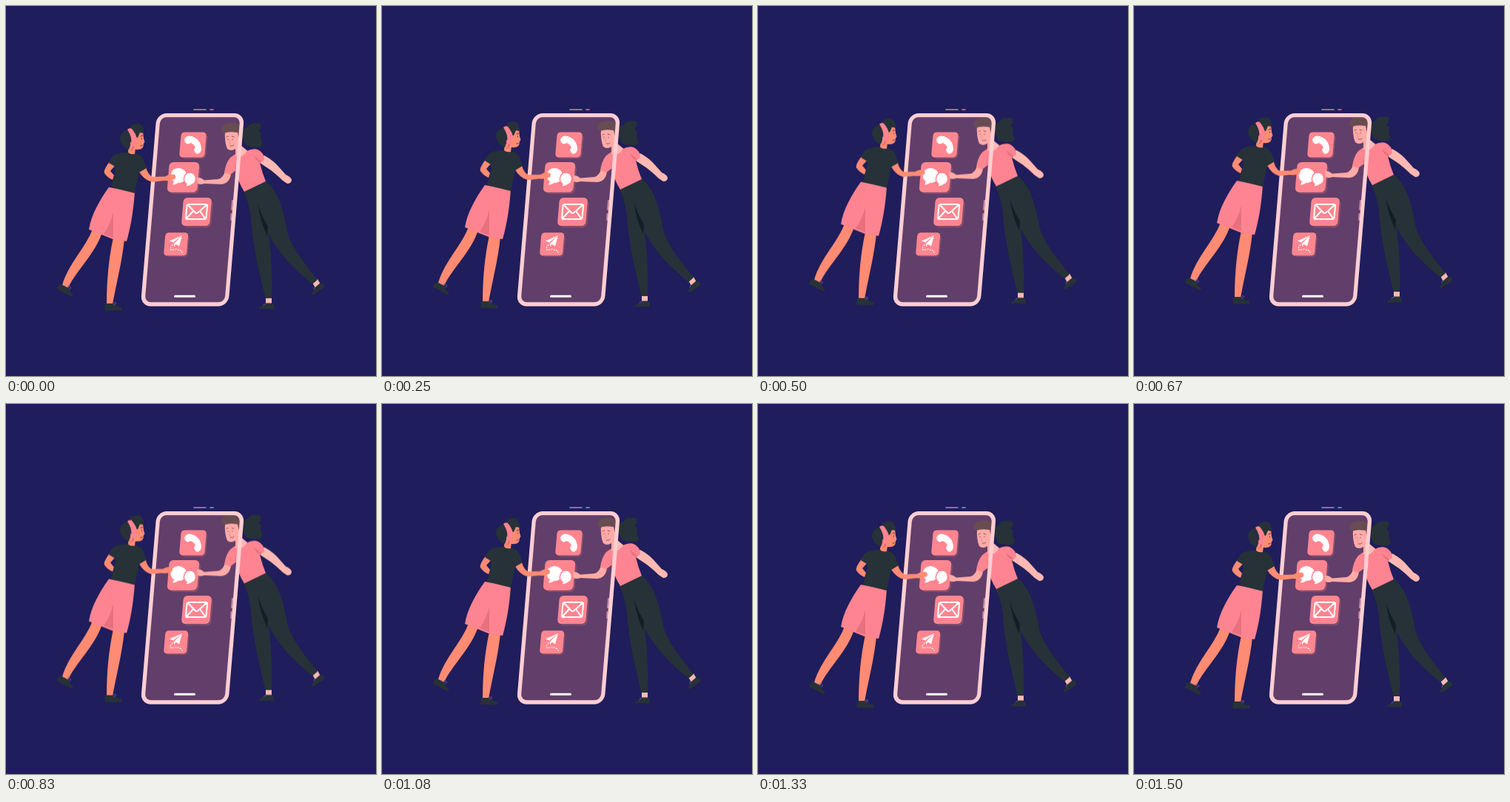
These frames come from a looping animation (500 px wide and 500 px high, 1.54 s). An HTML page without scripts:

```html
<!DOCTYPE html>
<html lang="en">
<head>
<meta charset="utf-8">
<title>Reaching through the phone</title>
<style>
  html, body { margin: 0; width: 100%; height: 100%; overflow: hidden; background: #1f1d5c; }
  svg { display: block; width: 100%; height: 100%; }

  .bob, .reach {
    animation: bob 1540ms cubic-bezier(.37, 0, .63, 1) -50ms infinite;
  }
  .reach { animation-name: reach; transform-origin: 182px 222px; }
  @keyframes bob { 50% { transform: translateY(-9px); } }
  @keyframes reach { 50% { transform: rotate(2deg) scaleX(.91); } }

  .dark { fill: #263238; }
  .deep { fill: #151d24; }
  .pink { fill: #ff8491; }
  .fold { fill: #e8717f; }
  .tan { fill: #ff8b73; }
  .fair { fill: #ffb9b2; }
  .white { fill: #fff; }
  .line { fill: none; stroke-linecap: round; stroke-linejoin: round; }
  .ink { stroke: #263238; stroke-width: .8; }
  .lace { stroke: #6b4a9c; stroke-width: 1; }
</style>
</head>
<body>
<svg viewBox="0 0 500 500">
  <defs>
    <rect id="glass" x="-56.6" y="-127.7" width="113.2" height="255.4" rx="11" transform="translate(252 275.3) skewX(-4.8)"/>
    <g id="tile">
      <rect x="-15" y="-15" width="35" height="35" rx="5" fill="#51345f"/>
      <rect x="-18" y="-18" width="36" height="36" rx="5" class="pink"/>
    </g>
  </defs>

  <!-- Tiles sit beneath the tinted glass -->
  <use href="#tile" transform="translate(252.500 187.500) skewX(-4.8) scale(.95)"/>
  <use href="#tile" transform="translate(239.500 231.300) skewX(-4.8) scale(1.13)"/>
  <use href="#tile" transform="translate(257.500 278) skewX(-4.8) scale(1.06)"/>
  <use href="#tile" transform="translate(229.700 321.800) skewX(-4.8) scale(.86)"/>

  <!-- Woman -->
  <g class="bob">
    <path class="dark" d="M318 167 Q327 165 329 160 Q336 157 344 159 Q346 165 341 170 L346 172 Q342 177 347 187 L344 191 Q334 192 325 189 Q319 181 318 167Z"/>
    <path class="fair" d="M351 393 H359 V403 H351Z M414 374 L421 369 L425 376 L418 381Z"/>
    <path class="dark" d="M350 401.500 L360 401.500 Q363 405 362 409.500 H342 Q341 407 345 406Z"/>
    <path class="dark" d="M425 374 Q431 376 430.500 380 L417 389.500 Q412 391 414 387 L418 380Z"/>
    <path class="line lace" d="M348 404 l3 -2 M416 383 l1 -3"/>
    <path class="dark" d="M321 251 L352 237 C366 249 374 270 379 299 C382 321 400 343 421 370 L414 376 C391 357 369 336 355 308 C359 340 360 370 359 395 L350.500 395 C342 360 335 330 332 300 C331 280 328 265 321 251Z"/>
    <path class="deep" d="M340 266 Q343 280 354 298 L353 311 Q344 293 340 266Z"/>
    <path class="fair" d="M343 206 L349 202 Q362 209 370 219 L378 228 Q385 231 386 235 Q386 240 380 240 L374 236 Q367 229 358 222 L343 212Z"/>
    <path class="fair" d="M296 223 L304 227 Q302 240 291 241 L268 240 Q263 242 259 240 L258 232 Q263 231 268 235.500 L287 234 Q294 232 296 223Z"/>
    <path class="pink" d="M303 205 Q312 197 325 196 Q334 192 340 194 Q349 198 349 208 L343 212 Q346 225 351 237 L322 251 Q313 237 311 222 L303 228 L295 225 Q297 212 303 205Z"/>
    <path class="fold" d="M309 211 L312 225 L309 220Z M335 202 Q337 209 344 212 L345 210Z"/>
    <path class="fair" d="M296 168 H315 L317 188 L326 195.500 Q320 206 310 203 L310 193 Q304 197 299 193 Q295 184 296 168Z"/>
    <path class="dark" d="M291 166 Q294 157 306 158 Q316 158 319 165 L318 184 Q315 183 313 171 Q301 169 295 172 Q291 171 291 166Z"/>
    <path class="line ink" d="M298 177 l2.500 -1 M305 176 l3 1 M300 180 v.8 M306 180 v.8 M303 189 q3 1 5 -1"/>
    <path class="line" d="M302.500 181 l-1 5 h2" stroke="#e5827f" stroke-width=".8"/>
  </g>

  <!-- Phone -->
  <use href="#glass" fill="#ff8b8e" fill-opacity=".3"/>
  <path class="line" d="M306 263 L305 275 M304.500 281 L304 289" stroke="#c98a9f" stroke-width="2"/>
  <use href="#glass" fill="none" stroke="#ffced2" stroke-width="5.3"/>
  <path class="line" d="M254 140 H270 M276 140 H280" stroke="#d77f96" stroke-width="1.6"/>
  <path class="line" d="M228.500 392.300 H254.500" stroke="#fff" stroke-width="3"/>

  <!-- Icons -->
  <path class="white" d="M241 181 Q242 176 248 175.500 L251 181 Q256 183 258 189 L264 193 Q264 198 259 200 Q255 199 254 194 L256 191 Q254 187 250 185 L246 186.500 Q242 186 241 181Z M248 175.500 Q263 178 264 193 L257 189 Q255 183 250 181Z"/>
  <path class="white" d="M233.500 219 a11 10 0 1 1 -1 20 Q229 242 225 241.500 L227 237 A11 10 0 0 1 233.500 219Z"/>
  <path class="white" d="M249 225 a8 8.500 0 0 1 2 16.500 Q248 244 243 243.500 L244 240.500 A8 8.500 0 0 1 249 225Z" stroke="#ff8491" stroke-width="1.4"/>
  <path class="line" d="M247 268 H270 Q272.500 268 272 270.500 L270.500 286 Q270 288 268 288 H245 Q242.500 288 243 285.500 L244.500 270 Q245 268 247 268Z M246 269 L256 279.500 Q257.500 280.500 259 279.500 L271 269 M244 287 L253 277 M269 287 L262 277" stroke="#fff" stroke-width="2"/>
  <path class="white" d="M238 310 L221 317.500 L226 319.500Z M238 310 L227.500 320.500 L234 324.500Z M226.500 320.500 L227.500 325 L229.500 322Z"/>
  <path class="line" d="M225 323 Q220 328 224 330 Q230 327 237 331 L238 333" stroke="#fff" stroke-width="1.1" stroke-dasharray="1.2 2.2"/>

  <!-- Man -->
  <g class="bob">
    <path class="tan" d="M117 301 C109 325 85 347 76 377 L84 381 C95 357 120 336 130 306Z M145 313 C139 340 136 370 136 403 H144 C149 375 157 345 160 315Z"/>
    <path class="dark" d="M73 376 L84 381 Q87 388 91 391 L89 393.500 L69 383 Q68 381 73 376Z M135 402 H145 Q150 406 157 408 L156 411.500 H134 Q132 406 135 402Z"/>
    <path class="line lace" d="M83 380 l2 -2 l3 3 l-3 2 M145 403 l2 -3 l2 2 l-3 2"/>
    <path class="tan" d="M141 209 Q131 222 133 226 Q137 232 144 235 L146 229 L141 223 L149 214Z"/>
    <path class="pink" d="M139 245 L174 251 C172 280 168 300 163 318 L144 315 L112 302 C115 283 126 263 139 245Z"/>
    <path class="fold" d="M145 279 Q141 295 132 308 L145 313Z"/>
    <g class="reach">
      <path class="tan" d="M179 223 L189 218 Q192 228 198 231 L215 230.500 Q222 226 228 228 Q231 231 228 234 Q221 237 214 236 L198 238 Q187 236 179 223Z"/>
    </g>
    <path class="dark" d="M149 200 Q162 196 175 199 Q184 202 186 208 L190 219 L180 225 L174 253 L142 245 L148 222 L147 217 L139 212 Q142 203 149 200Z"/>
    <path class="tan" d="M166 184 H176 L174 200 Q168 201 165 198Z M172 169 L185 169 L186 179 L187.500 184 L186 186 Q186 194 179 194 Q172 195 169 188Z"/>
    <path class="dark" d="M167 167 Q170 158 179 159 Q187 161 186 172 L181 171 L178 178 L170 176Z"/>
    <path class="dark" d="M166 167 Q154 169 154 180 Q156 191 166 194 Q171 184 166 167Z M169 163 l-1 -4 l4 3Z"/>
    <path class="pink" d="M164 167 Q167 164 170 166 Q182 180 173 191 Q170 193 167 192 Q173 181 164 167Z"/>
    <path class="line ink" d="M182 176 l3 -1 M183.500 179 v1 M182 189 q2 1 3 -1"/>
    <path class="line" d="M172 190 Q173 193 169 195" stroke="#b04a4a" stroke-width=".9"/>
  </g>
</svg>
</body>
</html>
```
